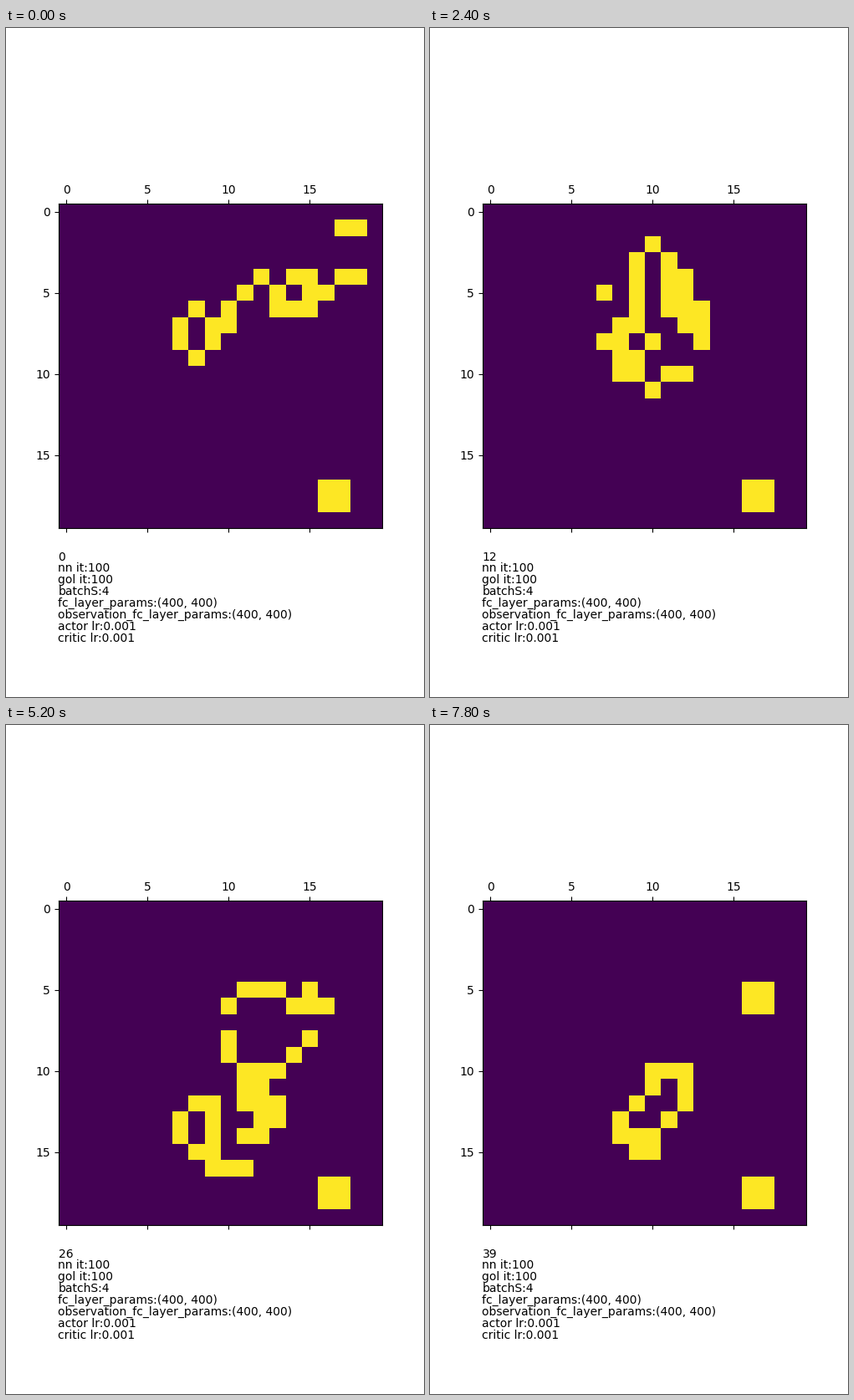
A matplotlib script for the animation above (8000 ms loop, 500 by 800 pixels).

```python
import numpy as np
import matplotlib.pyplot as plt
from matplotlib.animation import FuncAnimation

SIZE = 20
STEPS = 40
WIDTH, HEIGHT, DPI = 500, 800, 100
LINE = 14

# Corners (column, row) of the strokes that make up the first generation.
STROKES = [
    [(8, 6), (7, 7), (7, 8), (8, 9), (9, 8), (9, 7), (10, 7), (10, 6),
     (12, 4), (13, 5), (13, 6), (15, 6), (16, 5), (15, 5), (15, 4), (14, 4)],
    [(17, 1), (18, 1)],
    [(17, 4), (18, 4)],
    [(16, 17), (17, 17), (17, 18), (16, 18)],
]

LAYERS = (400, 400)
SETTINGS = {
    "nn it": 100,
    "gol it": 100,
    "batchS": 4,
    "fc_layer_params": LAYERS,
    "observation_fc_layer_params": LAYERS,
    "actor lr": 0.001,
    "critic lr": 0.001,
}


def draw_stroke(grid, corners):
    """Bring to life every cell on the line through the corners."""
    for (x0, y0), (x1, y1) in zip(corners, corners[1:]):
        count = max(abs(x1 - x0), abs(y1 - y0)) + 1
        cols = np.linspace(x0, x1, count).round().astype(int)
        rows = np.linspace(y0, y1, count).round().astype(int)
        grid[rows, cols] = 1


def life_step(grid):
    """Advance Conway's Game of Life by one generation."""
    pad = np.pad(grid, 1)
    near = sum(
        pad[r:r + SIZE, c:c + SIZE] for r in range(3) for c in range(3)
    ) - grid
    return ((near == 3) | ((grid == 1) & (near == 2))).astype(int)


first = np.zeros((SIZE, SIZE), dtype=int)
for corners in STROKES:
    draw_stroke(first, corners)
history = [first]
while len(history) < STEPS:
    history.append(life_step(history[-1]))

fig, ax = plt.subplots(figsize=(WIDTH / DPI, HEIGHT / DPI), dpi=DPI)
image = ax.matshow(first, cmap="viridis", vmin=0, vmax=1)


def put_text(y, text):
    """Place text with its baseline y pixels below the top edge."""
    return fig.text(0.125, 1 - y / HEIGHT, text, fontsize=10)


counter = put_text(637, "0")
for i, (name, value) in enumerate(SETTINGS.items()):
    put_text(650 + LINE * i, f"{name}:{value}")


def update(i):
    image.set_data(history[i])
    counter.set_text(str(i))
    return image, counter


anim = FuncAnimation(fig, update, frames=STEPS, interval=200,
                     repeat=True, repeat_delay=0)
plt.show()
```
